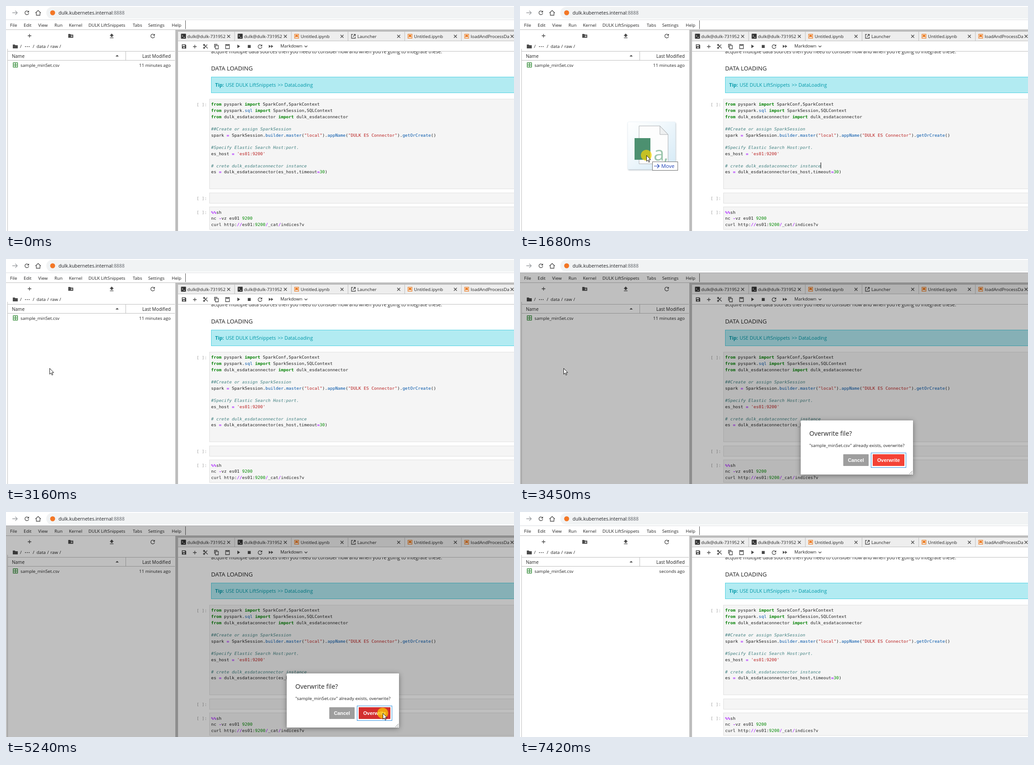
Recreate the animation shown at these times as an HTML page. Size 1122 by 499 pixels, loop 8280 ms.

```html
<!DOCTYPE html>
<html lang="en">
<head>
<meta charset="utf-8">
<title>Notebook upload</title>
<style>
html, body { margin: 0; width: 100%; height: 100%; overflow: hidden; background: #fff; }
svg { display: block; }
text { font: 9.75px "Open Sans", "Noto Sans", sans-serif; fill: #212121; white-space: pre; }
.url { font-size: 10.45px; fill: #202124; }
.head { font-size: 10px; font-weight: 500; }
.prose { font-size: 10.63px; }
.h2 { font-size: 13.1px; font-weight: 500; }
.tip text { font-size: 10.65px; fill: #0097a7; }
.code text, .prompt { font: 9.49px "DejaVu Sans Mono", "Noto Sans Mono", monospace; }
.prompt { fill: #9e9e9e; }
.k { fill: #008000; font-weight: bold; }
.o { fill: #aa22ff; font-weight: bold; }
.p { fill: #0055aa; }
.s { fill: #ba2121; }
.n { fill: #008800; }
.c { fill: #408080; font-style: italic; }
.cell { fill: #f5f5f5; stroke: #e0e0e0; }
.line { fill: none; stroke: #bdbdbd; }
.ico { fill: none; stroke: #4a4a4a; stroke-width: 1.3; }
.solid { fill: #4a4a4a; }
.title { font-size: 14.05px; }
.btn { font: bold 10.9px "Liberation Sans", sans-serif; fill: #fff; }
#modal rect.box { filter: drop-shadow(0 2px 6px rgba(0,0,0,.4)); }
#card { filter: drop-shadow(1px 2px 1.5px rgba(60,90,110,.35)); }
</style>
</head>
<body>
<svg width="1122" height="499" viewBox="0 0 1122 499">
  <defs>
    <linearGradient id="sky" x1="0" y1="0" x2="1" y2="1">
      <stop offset="0" stop-color="#fff"/><stop offset=".4" stop-color="#f1f8fc"/><stop offset="1" stop-color="#d3e9f6"/>
    </linearGradient>
    <clipPath id="below"><rect x="380" y="101" width="742" height="398"/></clipPath>
    <g id="reload">
      <path class="ico" d="M3.2 -2.8A4.2 4.2 0 1 0 4.2 .8"/>
      <path class="solid" d="M4.8 -5V-.8H.6Z"/>
    </g>
    <path id="plus" class="ico" d="M-4 0H4M0 -4V4"/>
    <path id="folder" d="M-5.5 -4H-1L.5 -2.5H5.5V4.5H-5.5Z"/>
    <g id="term">
      <rect width="11" height="11" rx="1" fill="#333"/>
      <path d="M2.2 3L4.4 5L2.2 7M5.5 8H8.5" fill="none" stroke="#fff"/>
    </g>
    <g id="book">
      <rect x=".5" y="1" width="9" height="9" fill="none" stroke="#ef6c00"/>
      <path d="M2.300 2.700H7.700V8.300L5 6.200L2.300 8.300Z" fill="#ef6c00"/>
    </g>
    <path id="open" class="ico" d="M4 1.5H1V10H9.5V7M6 1.5H9.5V5M9.3 1.7L4.5 6.5"/>
  </defs>

  <!-- browser bar -->
  <rect x="89" y="2" width="1060" height="26" rx="13" fill="#f1f3f4"/>
  <path class="ico" style="stroke:#9a9da1" d="M14 15H25M20.5 10.5L25 15L20.5 19.5"/>
  <use href="#reload" x="46" y="15"/>
  <path class="ico" d="M65 15.5L71 10L77 15.5M67 14.5V20.5H75V14.5"/>
  <circle cx="103" cy="15" r="5.5" fill="#f37726"/>
  <text class="url" x="116" y="19">dulk.kubernetes.internal<tspan fill="#5f6368">:8888</tspan></text>
  <path d="M0 30.5H1122" stroke="#dadce0"/>

  <!-- menu -->
  <g id="menu"></g>
  <path d="M396.5 32V51" stroke="#555"/>
  <path class="line" d="M0 52.5H1122"/>

  <!-- file browser -->
  <path class="line" d="M3.5 95V499M3 100.5H373M3 120.5H373M264.5 101V120"/>
  <use href="#plus" x="52" y="66"/>
  <use href="#folder" class="solid" x="143" y="66"/>
  <path d="M143 67H147M145 65V69" stroke="#fff"/>
  <path class="solid" d="M233.5 61L238 66H235.5V68.5H231.5V66H229ZM229.5 70H237.5V71.3H229.5Z"/>
  <use href="#reload" x="324" y="66.5"/>
  <use href="#folder" class="solid" x="20.5" y="89.5"/>
  <g id="crumbs"></g>
  <g class="solid"><circle cx="43" cy="90" r="1.1"/><circle cx="47" cy="90" r="1.1"/><circle cx="51" cy="90" r="1.1"/></g>
  <text class="head" x="13" y="114.5">Name</text>
  <path class="solid" d="M242 112L245.5 108.5L249 112Z"/>
  <text class="head" x="364" y="114.5" text-anchor="end">Last Modified</text>
  <path d="M16 126H25.5V135.5H16ZM20.7 126V135.5M16 130.7H25.5" fill="none" stroke="#388e3c" stroke-width="1.4"/>
  <text x="32" y="134.5">sample_minSet.csv</text>
  <text id="age" x="364" y="134.5" text-anchor="end">11 minutes ago</text>

  <!-- dock and tabs -->
  <path fill="#bdbdbd" d="M374 53H1122V57H380V499H374Z"/>
  <rect x="380" y="57" width="742" height="20" fill="#eee"/>
  <g id="tabs"></g>
  <path class="line" d="M380 77.5H1122"/>

  <!-- notebook -->
  <g clip-path="url(#below)">
    <text class="prose" x="453" y="105">acquire multiple data sources then you need to consider how and when you're going to integrate these.</text>
  </g>
  <path class="line" d="M380 100.5H1122"/>
  <g>
    <path class="solid" fill-rule="evenodd" d="M388.5 85H396L398 87V94.5H388.5ZM390 86.5V89H395V86.5ZM393 90.5A1.5 1.5 0 1 0 393.1 90.5Z"/>
    <use href="#plus" x="417" y="90"/>
    <path class="ico" d="M437 85.5L445.5 94M444.5 85.5L437.5 93"/>
    <circle class="ico" cx="437.5" cy="86.5" r="1.5"/><circle class="ico" cx="437.5" cy="93" r="1.5"/>
    <path class="ico" d="M460.5 92.5V85H467M462.5 87.5H469V95H462.5Z"/>
    <path class="ico" d="M485 85.5H493.5V94.5H485ZM487 85.5V87.5H491.5V85.5"/>
    <path class="solid" d="M511 85.5L517 89.5L511 93.5ZM534 86.5H540.5V93H534ZM580.5 86L585 89.5L580.5 93ZM585.5 86L590 89.5L585.5 93Z"/>
    <use href="#reload" x="561" y="90"/>
    <text x="606" y="92">Markdown</text>
    <path class="ico" d="M659.5 88L662.5 91L665.5 88"/>
  </g>
  <text class="h2" x="453" y="143">DATA LOADING</text>
  <g class="tip">
    <rect x="453.5" y="157.5" width="680" height="35" fill="#b2ebf2" stroke="#4dd0e1"/>
    <text x="462" y="179" style="font-weight:bold">Tip:</text>
    <text x="485" y="179">USE DULK LiftSnippets</text>
    <text x="600" y="179">&gt;&gt; DataLoading</text>
  </g>
  <rect class="cell" x="449.5" y="206.5" width="690" height="199"/>
  <rect class="cell" x="449.5" y="414.5" width="690" height="23"/>
  <rect class="cell" x="449.5" y="445.5" width="690" height="50"/>
  <text class="prompt" x="421" y="222">[ ]:</text>
  <text class="prompt" x="421" y="430">[ ]:</text>
  <text class="prompt" x="421" y="461">[ ]:</text>
  <g class="code" id="code"></g>
  <path id="caret" stroke="#000" d="M710.5 361V374"/>
  <path id="dropCaret" stroke="#000" d="M664.5 347V360"/>

  <g id="dropZone" stroke="#bdbdbd" stroke-width="4" stroke-dasharray="8 4">
    <path d="M7 127H369"/><path d="M9 125V499"/><path d="M367 125V499"/>
  </g>

  <!-- dialog -->
  <g id="modal">
    <rect y="30" width="1122" height="469" fill-opacity=".25"/>
    <rect class="box" x="620" y="358" width="248" height="120" rx="1" fill="#fff"/>
    <text class="title" x="639" y="392">Overwrite file?</text>
    <text x="639" y="416.5">"sample_minSet.csv" already exists, overwrite?</text>
    <rect x="714" y="433" width="56" height="26" rx="1" fill="#9e9e9e"/>
    <text class="btn" x="742" y="449.5" text-anchor="middle">Cancel</text>
    <rect x="775.5" y="430" width="77" height="32.5" fill="none" stroke="#2f8fe0"/>
    <rect id="ok" x="779" y="433" width="70" height="26" rx="1"/>
    <text class="btn" x="814" y="449.5" text-anchor="middle">Overwrite</text>
    <path d="M860 477L867 470M864 477L867 474" stroke="#777"/>
  </g>

  <!-- dragged file -->
  <g id="ghost">
    <rect id="card" width="105" height="105" rx="2" fill="url(#sky)" stroke="#e3eff6" stroke-width=".6"/>
    <path d="M25 9H71L89 28V93H25Z" fill="#fdfdfd" stroke="#a9adb0"/>
    <path d="M71 9V28H89Z" fill="#eef0f1" stroke="#a9adb0"/>
    <text x="57" y="86" style="font-size:43px;font-weight:500;letter-spacing:-2px;fill:#9cc6ae">a,</text>
    <rect x="15" y="36" width="35" height="48" fill="#4c9070"/>
  </g>
  <circle id="press" r="12" fill="#ffd800" fill-opacity=".68"/>
  <g id="hint">
    <rect x="54.5" y="88.5" width="56" height="19" fill="#fff" stroke="#6e6e6e"/>
    <path d="M58 98H69.5M65 93.5L69.5 98L65 102.5" fill="none" stroke="#1c3fb5" stroke-width="1.2"/>
    <text x="74" y="102" style="font-size:11.4px;fill:#1c3fb5">Move</text>
  </g>
  <path id="arrow" d="M.5 .5V13.5L3.5 10.8L5.5 15.5L7.5 14.6L5.5 10H9.5Z" fill="#fff" stroke="#000" stroke-width=".9"/>
  <path id="beam" d="M-2.5 -6H-.5L0 -5.5L.5 -6H2.5M0 -5.5V5.5M-2.5 6H-.5L0 5.5L.5 6H2.5" fill="none" stroke="#222" stroke-width="1.1"/>
</svg>
<script>
const LOOP = 8280, TICK = 76;
const el = id => document.getElementById(id);
const words = (list, y) => list.map(([x, s]) => `<text x="${x}" y="${y}">${s}</text>`).join('');

el('menu').innerHTML = words([[9, 'File'], [39, 'Edit'], [71, 'View'], [107, 'Run'], [139, 'Kernel'],
  [182, 'DULK LiftSnippets'], [280, 'Tabs'], [314, 'Settings'], [366, 'Help']], 45.5);
el('crumbs').innerHTML = words([[31, '/'], [59, '/'], [67.5, 'data'], [91, '/'], [98, 'raw'], [118, '/']], 93);

const tabs = [['term', 'dulk@dulk-731952'], ['term', 'dulk@dulk-731952'], ['book', 'Untitled.ipynb'],
  ['open', 'Launcher'], ['book', 'Untitled.ipynb'], ['book', 'loadAndProcessData.ipynb']];
el('tabs').innerHTML = tabs.map(([icon, name], i) => {
  const x = 380 + i * 125.2;
  return `<clipPath id="t${i}"><rect x="${x}" y="57" width="106" height="20"/></clipPath>
    <use href="#${icon}" x="${x + 6.5}" y="61.5"/>
    <text x="${x + 20.3}" y="71" clip-path="url(#t${i})">${name}</text>
    <path class="ico" d="M${x + 108.5} 64l6.5 6.5m0 -6.5l-6.5 6.5"/>
    <path class="line" d="M${x + 125} 57V77"/>`;
}).join('');

// Inline markup: {k:word} colours a word with class k.
const paint = s => s.replace(/\{(\w):([^}]*)\}/g, '<tspan class="$1">$2</tspan>');
const block = (lines, top) => lines.map((s, i) =>
  `<text x="453" y="${top + i * 13.65}" xml:space="preserve">${paint(s)}</text>`).join('');
el('code').innerHTML = block([
  '{k:from} pyspark {k:import} SparkConf,SparkContext',
  '{k:from} pyspark.{p:sql} {k:import} SparkSession,SQLContext',
  '{k:from} dulk_esdataconnector {k:import} dulk_esdataconnector',
  '',
  '{c:##Create or assign SparkSession}',
  'spark {o:=} SparkSession.{p:builder}.{p:master}({s:"local"}).{p:appName}({s:"DULK ES Connector"}).{p:getOrCreate}()',
  '',
  '{c:#Specify Elastic Search Host:port.}',
  "es_host {o:=} {s:'es01:9200'}",
  '',
  '{c:# crete dulk_esdataconnector instance}',
  'es {o:=} dulk_esdataconnector(es_host,timeout{o:=}{n:30})'
], 221.3) + block([
  '{o:%%}sh',
  'nc {o:-}vz es01 {n:9200}',
  'curl http:{o://}es01:{n:9200}{o:/}_cat{o:/}indices?v'
], 460.7);

// Each point is [time, x, y].
const arrowPath = [[1450, 957, 474], [1530, 742, 400], [1600, 497, 354], [1680, 280, 331], [1750, 222, 309],
  [1900, 170, 281], [2220, 136, 262], [2290, 119, 253], [2610, 97, 242], [4000, 97, 242],
  [4390, 500, 365], [4780, 848, 456], [5010, 848, 451], [5240, 833, 446]];
const beamPath = [[5470, 834, 447], [6900, 834, 447], [7200, 965, 404], [7420, 1049, 478]];

function along(path, t) {
  const i = path.findIndex(p => p[0] > t);
  if (i < 0) return path[path.length - 1].slice(1);
  if (i === 0) return path[0].slice(1);
  const [t0, x0, y0] = path[i - 1], [t1, x1, y1] = path[i];
  const u = Math.floor((t - t0 + 1) / TICK) * TICK / (t1 - t0);
  return [x0 + (x1 - x0) * u, y0 + (y1 - y0) * u];
}

const shown = {
  caret: [[1290, 1450]], dropCaret: [[1600, 1750]], dropZone: [[1750, 3160]],
  ghost: [[1450, 2920]], hint: [[1450, 2920]], press: [[1450, 2920], [5170, 5470]],
  arrow: [[1450, 3850], [4000, 5470]], beam: [[5470, 7420]], modal: [[3450, 5470]]
};
const place = (id, x, y) => el(id).setAttribute('transform', `translate(${x} ${y})`);

function draw(t) {
  for (const id in shown)
    el(id).style.display = shown[id].some(([a, b]) => t >= a && t < b) ? '' : 'none';
  const [x, y] = along(arrowPath, t);
  place('arrow', x - 1, y);
  place('press', x - 1, y);
  place('ghost', x - 42, y - 74);
  place('hint', x - 42, y - 74);
  place('beam', ...along(beamPath, t));
  el('ok').setAttribute('fill', t >= 5010 ? '#d32f2f' : '#f44336');
  el('age').textContent = t >= 5640 ? 'seconds ago' : '11 minutes ago';
}

const start = performance.now();
function frame() {
  draw((performance.now() - start) % LOOP);
  requestAnimationFrame(frame);
}
draw(0);
requestAnimationFrame(frame);
</script>
</body>
</html>
```
